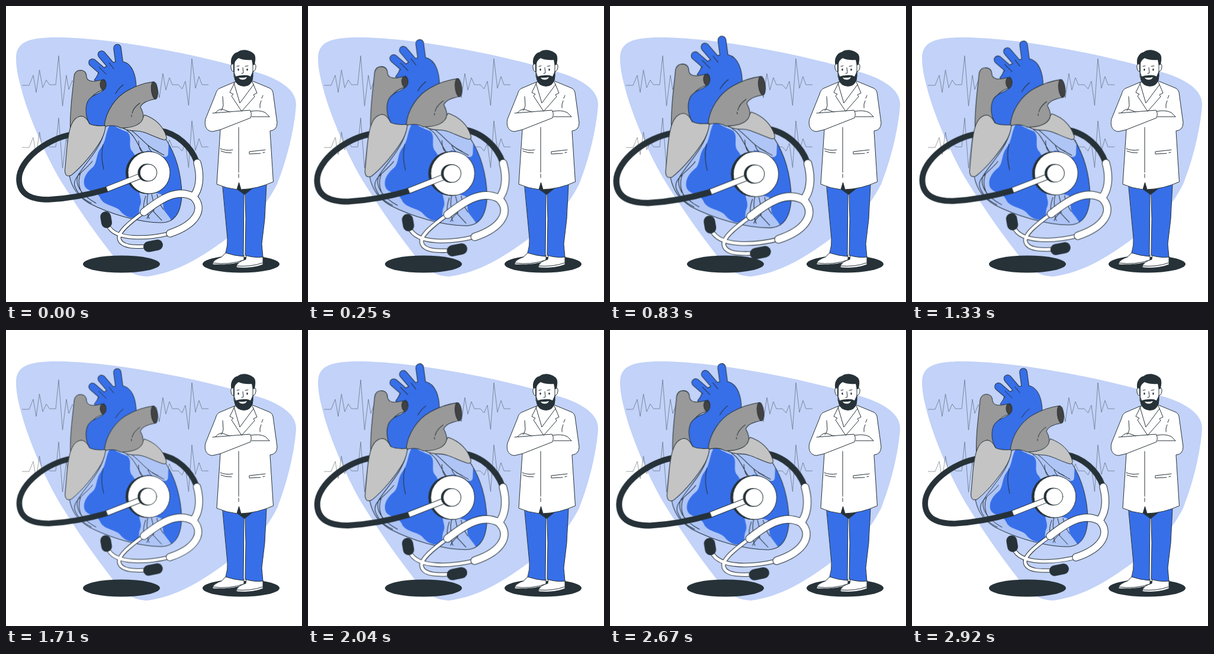
Animation of 500x500 px, one loop 2.96 s. Source, as an HTML page:

```html
<!DOCTYPE html>
<html lang="en">
<head>
<meta charset="utf-8">
<title>Heart check-up</title>
<style>
  html, body { margin: 0; width: 100%; height: 100%; overflow: hidden; background: #fff; }
  svg { display: block; width: 100vw; height: 100vh; }
  :root { --ink: #263238; --blue: #376fe9; --pale: #c2d2f8; --mist: #afc5f6; --grey: #999; --silver: #c4c4c4; }
  .ink { fill: var(--ink); }
  .blue { fill: var(--blue); }
  .pale { fill: var(--pale); }
  .mist { fill: var(--mist); }
  .white { fill: #fff; }
  .grey { fill: var(--grey); }
  .silver { fill: var(--silver); }
  .line { stroke: var(--ink); stroke-width: 1; stroke-linejoin: round; stroke-linecap: round; }
  .bare { fill: none; }
  .ecg { fill: none; stroke: var(--ink); stroke-width: .7; opacity: .65; }
  .hose { fill: none; stroke: var(--ink); stroke-width: 9.6; }
  .tube { fill: none; stroke-linecap: round; }
  .edge { stroke: var(--ink); }
  .core { stroke: #fff; }
  .thick.edge { stroke-width: 13.4; }
  .thick.core { stroke-width: 11.4; }
  .thin.edge { stroke-width: 7; }
  .thin.core { stroke-width: 5; }
  .stem.edge { stroke-width: 10; stroke-linecap: butt; }
  .stem.core { stroke-width: 8; stroke-linecap: butt; }
  .bud { stroke: var(--ink); stroke-width: 18; stroke-linecap: round; }
  .branch.edge { stroke-width: 13.6; }
  .branch.core { stroke: var(--blue); stroke-width: 11.6; }
  #beat { transform-origin: 174px 250px; animation: beat 2960ms linear infinite; }
  @keyframes beat {
    0% { transform: scale(1); }
    18.92%, 79.73% { transform: scale(1.0986); }
    59.46%, 100% { transform: scale(.993); }
  }
</style>
</head>
<body>
<svg viewBox="0 0 500 500">
  <defs>
    <g id="pulse">
      <path d="M27 134H39L46 117 51 146 56.500 108 62 138 68 125 73.500 133H84L89 84 95.500 169 102 117 106 141 112 126 118 133"/>
      <path d="M254 130L259 155 265 114 270 142 276 121 281 133H291L297.500 140 303 127 308.500 168 314 89 320 139 326 119 331 133H342"/>
    </g>
    <path id="branches" d="M188 71L191.500 97M161.500 82L182 106M146 95.500L172 118"/>
    <path id="arms" d="M323 265C330 290 326 311 316 322M233 348C262 325 289 308 316 322C335 340 325 368 277 384"/>
    <path id="wires" d="M233 348C208 366 190 381 191 392C193 408 220 407 240 406M277 384C240 393 184 397 172 370"/>
    <path id="rod" d="M170 309.500L230 286"/>
    <clipPath id="bodyClip">
      <path id="body" d="M168 202C155 238 130 268 107 286C111 308 122 322 140 333C175 351 225 366 262 366C286 366 296 348 297 318C296 284 287 251 270 225L225 203L178 198Z"/>
    </clipPath>
  </defs>

  <path class="pale" d="M17 88C17 61 38 53 85 53C170 53 320 79 430 114C475 129 491 148 490 168C487 208 475 258 458 301C434 348 404 372 370 395C330 424 290 450 238 457C208 456 192 438 177 417C143 373 118 336 93 296C70 258 45 202 31 158C22 127 17 108 17 88Z"/>
  <g class="ecg"><use href="#pulse"/><use href="#pulse" y="105"/></g>
  <ellipse class="ink" cx="195" cy="436" rx="65" ry="14.500"/>
  <ellipse class="ink" cx="397" cy="436" rx="65" ry="14.500"/>

  <g id="beat">
    <path class="hose" d="M322 263C313 238 290 215 258 210M112 217C70 223 22 260 22 292.500"/>

    <!-- ventricles -->
    <use href="#body" class="blue"/>
    <g class="mist" clip-path="url(#bodyClip)">
      <path d="M177 199C168 210 170 228 160 240C152 250 154 265 147 272C137 280 130 290 132 301C134 314 154 312 159 324C164 337 184 337 192 345C199 354 208 359 219 358C228 356 223 347 226 338C232 326 222 318 226 308L262 318C268 330 262 340 270 349C276 357 279 360 281 366L260 380L90 350L90 200Z"/>
      <path d="M177 198Q186 206 205 213C214 221 206 234 212 244C218 250 218 256 222 262L246 262L238 244Q248 245 258 251C268 257 274 256 274 248L275 222L225 200Z"/>
    </g>
    <use href="#body" class="bare line"/>
    <g class="bare line">
      <path d="M164 234C160 250 162 263 165 276M166 212C161 240 130 270 121 287C117 300 124 318 152 333M146 262C132 280 112 288 116 304C122 320 132 327 144 333M126 282Q119 300 129 317"/>
      <path d="M204 210C218 218 222 235 232 248M213 211C228 222 238 238 257 246M224 228Q224 240 229 246M240 236Q243 246 251 249M247 241L267 252"/>
      <path d="M240 316Q236 332 241 346Q238 354 242 359M246 318Q251 336 249 347L263 362M255 318Q258 333 266 344M236 321Q231 335 233 345M250 345Q242 350 238 359"/>
    </g>

    <!-- vessels and atria -->
    <path class="blue line" d="M157 109Q155 118 149 125L166 140L178 110Z"/>
    <path class="grey line" d="M108.500 206C108 170 113 143 115 118Q117 108.500 126 108.500Q136 109 136 120Q138 128 150 127L164 124.500L164 142Q140 149 138 172L145 204Z"/>
    <ellipse class="line" fill="#424242" cx="164.300" cy="133.500" rx="5.200" ry="8.800" transform="rotate(-8 164.300 133.500)"/>
    <use href="#branches" class="tube branch edge"/>
    <path class="blue line" d="M163 110L167 103L176 100L182 95Q190 93 198 94C214 98 220 118 220 139L168 204L143 201C134 190 133 172 138 161C145 149 158 149 165 142C171 137 170 127 165 124Z"/>
    <use href="#branches" class="tube branch core"/>
    <path class="blue" d="M160 109L154 121L164 124L174 112Z"/>
    <path class="bare line" d="M157 103L169 115M174 96L182 106M198 133Q190 139 185 148"/>
    <path class="silver line" d="M234 184C252 190 266 203 271 221Q272 227 266 226C246 220 235 211 219 211Q205 211 197 206Q222 205 234 184Z"/>
    <path class="grey line" d="M166 204C168 178 185 154 205 143Q226 131 249 128L253 157Q230 161 227 171Q231 177 232 186C231 201 213 206 194 206Q181 199 166 204Z"/>
    <ellipse class="line" fill="#424242" cx="250.800" cy="142.500" rx="5.300" ry="14.700" transform="rotate(-7 250.800 142.500)"/>
    <path class="bare line" d="M226 164Q215 172 213 181M212 184V187"/>
    <path class="silver line" d="M127 186C110 188 105 210 102 250L99.500 278Q100 290 110 286C128 272 150 245 161 226Q168 212 168 202C156 203 147 202 141 199Q135 186 127 186Z"/>

    <!-- stethoscope -->
    <path class="hose" d="M22 292C22 320 45 327 72 327C108 325 145 317 171 309.500"/>
    <use href="#wires" class="tube thin edge"/><use href="#wires" class="tube thin core"/>
    <use href="#arms" class="tube thick edge"/><use href="#arms" class="tube thick core"/>
    <path class="bud" d="M168.300 356L170 366M241 406.500L256 403.500"/>
    <circle class="ink" cx="238" cy="281.500" r="36"/>
    <circle class="white line" cx="241.500" cy="281.500" r="35.500"/>
    <use href="#rod" class="tube stem edge"/><use href="#rod" class="tube stem core"/>
    <path class="line" d="M168.500 305L172 314"/>
    <circle class="ink" cx="237.500" cy="281.500" r="15"/>
    <circle class="white line" cx="240.500" cy="281.500" r="14.300"/>
  </g>

  <!-- doctor -->
  <path class="white" d="M401 312H407L405 424H400Z"/>
  <path class="white line" d="M349 434Q352 428 364 424L372 416L402 421V430Q388 438 352 437Q348 437 349 434Z"/>
  <path class="white line" d="M389 439Q393 431 405 428L406 420L434 423V437Q416 444 391 442Q388 441 389 439Z"/>
  <path class="bare line" d="M349 434Q377 438 402 429M389 439Q414 441 433 434"/>
  <path class="blue line" d="M366 303L402 310L401 423Q386 422 371 417Q375 404 374 392Z"/>
  <path class="blue line" d="M404 310L440 301L437 360L432 402L434 424Q420 426 404 421L405 360Z"/>
  <path class="ink" d="M389 309L393.500 297L398 309L417 308L403 319Z"/>
  <path class="white line" d="M387 128L361 139Q356 141 354 149L337 191C334 204 340 212 349 212L362 209L356 301Q372 308 390 310L393.500 298L397 310Q425 309 451.500 297L446 211Q458 210 458 197L451 146Q450 141 446 139L417 127Z"/>
  <g class="bare line">
    <path d="M385 130L395 164L418 133M387 128L378 146L384 149L381 152L398 178L420 153L418 150L424 147L416 128"/>
    <path d="M393 205V281M393 284V290M366 153L367 168Q366 174 363 177M434 151L432 156M431 160Q428 166 429 172"/>
    <path d="M349 181L412 176Q416 181 413 189L362 209M354 180Q362 172 367 175L378 179M413 178Q428 175 438 180L445 187M415 187H445"/>
    <path d="M362 241Q371 245 383 243M363 245Q372 249 381 248M438 243L411 246V250L430 249M434 248L437 247"/>
  </g>

  <path class="white line" d="M385 98Q379 96 380 104Q381 112 386 111M417 98Q423 96 422 104Q421 111 416 111"/>
  <path class="white line" d="M385 85V119Q391 134 402 134Q415 133 417 119V85Z"/>
  <path class="ink" d="M380.500 99C378 87 385 79 391 78C400 71 412 75 418 80C423 84 421 93 420 99L417 100L415 91Q402 92 393 88Q386 92 386 99V112L384 110V98Z"/>
  <path class="ink" d="M385 109L388 119Q394 117 400 117Q408 116 413 119L417.500 109L417 124Q413 136 402 136Q389 135 386 124Z"/>
  <path class="white" d="M393 121Q400 122 407 120Q405 124.500 400 124.500Q395 124.500 393 121Z"/>
  <path class="bare line" d="M390 102L394 101M404 102L409 101M400 104L401 113L398 114"/>
  <ellipse class="ink" cx="392.500" cy="107.500" rx="1.200" ry="2"/>
  <ellipse class="ink" cx="407.500" cy="107.500" rx="1.200" ry="2"/>
</svg>
</body>
</html>
```
